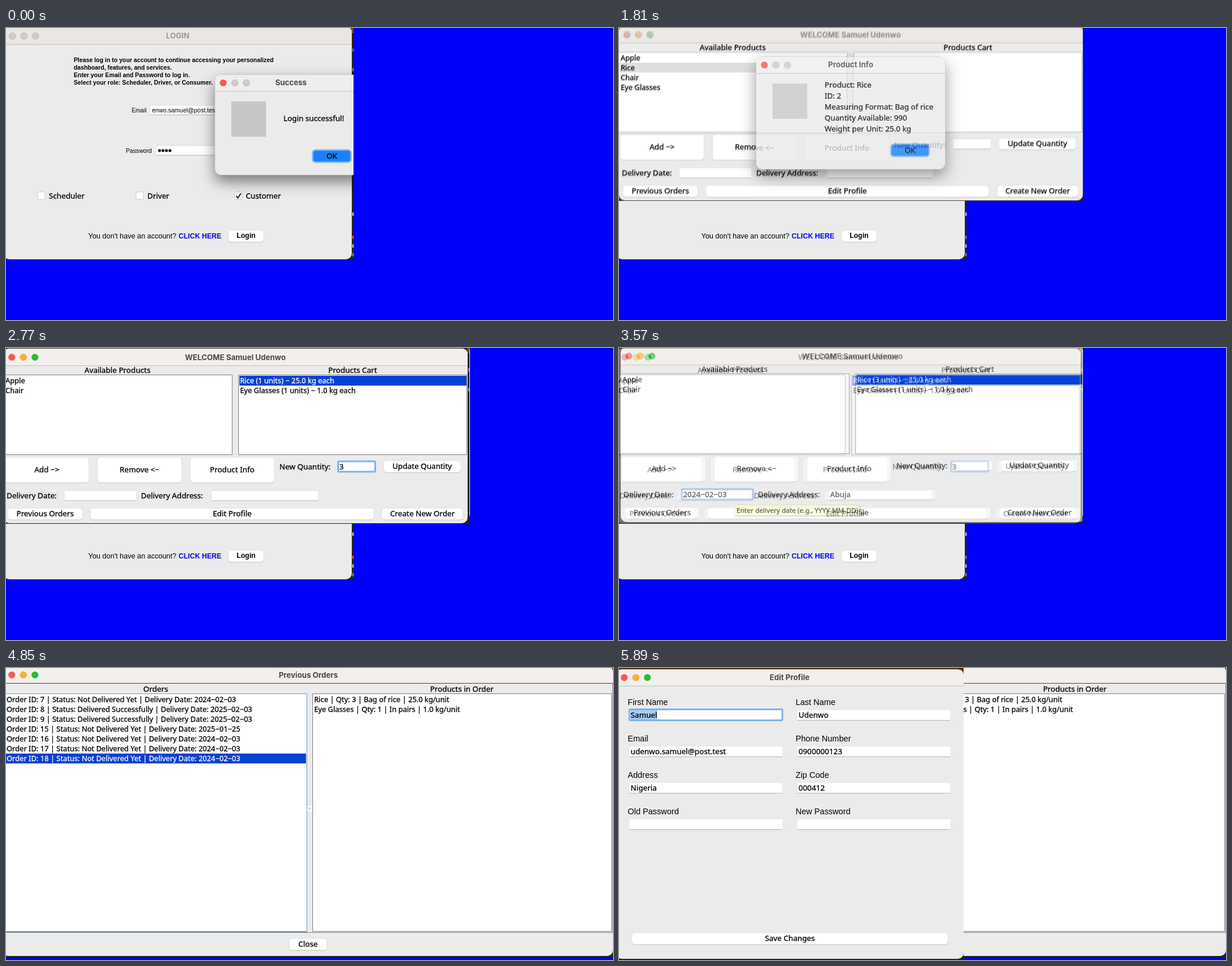
An HTML page for the animation above (6190 ms loop, 1048 by 505 pixels).

```html
<!DOCTYPE html>
<html lang="en">
<head>
<meta charset="utf-8">
<title>Order desk walkthrough</title>
<style>
html, body { margin: 0; width: 100%; height: 100%; overflow: hidden; background: #00f; }
svg { display: block; }
text { white-space: pre; }
</style>
</head>
<body>
<svg id="stage" xmlns="http://www.w3.org/2000/svg" width="1048" height="505" viewBox="0 0 1048 505"></svg>
<script>
const UI = "'Noto Sans', 'Open Sans', sans-serif";
const TITLE = "Inter, Roboto, sans-serif";
const ARIAL = "'Liberation Sans', Arial, sans-serif";
const PANEL = '#ebebeb', BAR = '#f3efec', DARK = '#242322', SELECT = '#0441d4';
const LIGHTS = ['#ff564e', '#fdb225', '#20c032'];
const OFF = ['#cfcbc9', '#cfcbc9', '#cfcbc9'];
const FIRST = 'Samuel', LAST = 'Udenwo';

const rect = (x, y, w, h, fill, more = '') =>
  `<rect x="${x}" y="${y}" width="${w}" height="${h}" fill="${fill}" ${more}/>`;
const line = (x1, y1, x2, y2, stroke, width = 1) =>
  `<path d="M${x1} ${y1}L${x2} ${y2}" stroke="${stroke}" stroke-width="${width}"/>`;

// y is the middle of the capitals; a hairline stroke gives the UI font its darker look
function text(x, y, str, { size = 13.2, font = UI, fill = '#000', weight = 400, anchor = 'start' } = {}) {
  const safe = str.replace(/</g, '&lt;').replace(/>/g, '&gt;');
  const stroke = font === UI ? `stroke="${fill}" stroke-width=".3"` : '';
  return `<text x="${x}" y="${y + size * 0.35}" font-family="${font}" font-size="${size}" ` +
    `font-weight="${weight}" fill="${fill}" text-anchor="${anchor}" ${stroke}>${safe}</text>`;
}
const label = (x, y, str) => text(x, y, str, { anchor: 'middle' });
const item = (x, y, str, fill) => text(x, y, str, { size: 12.6, fill });
const title = (x, y, str, fill = '#4b4745') =>
  text(x, y, str, { size: 13, font: TITLE, weight: 700, anchor: 'middle', fill });

const lights = (x, y, colors) => colors.map((c, i) =>
  `<circle cx="${x + i * 20}" cy="${y}" r="5.8" fill="${c}" stroke="#000" stroke-opacity=".12"/>`).join('');

function button(x, y, w, h, str, style) {
  return rect(x, y + 1, w, h, '#c6c6c6', 'rx="5.5"') +
    rect(x, y, w, h, '#fff', 'rx="5.5" stroke="#d9d9d9" stroke-width=".6"') +
    text(x + w / 2, y + h / 2 - 1, str, { ...style, anchor: 'middle' });
}

function field(x, y, w, h, str = '', focus = false) {
  const box = focus
    ? rect(x, y, w, h, '#fff', 'stroke="#7fb3ec" stroke-width="3" rx="1.5"')
    : rect(x, y, w, h, '#fff') + line(x, y + h, x + w, y + h, '#b4b4b4') +
      line(x, y + 0.5, x + w, y + 0.5, '#dedede');
  return box + text(x + 2, y + h / 2 + 0.5, str);
}

const list = (x, y, w, h, stroke = '#7d7d7d') =>
  rect(x + 0.5, y + 0.5, w, h, '#fff', `stroke="${stroke}"`);

// Dark desktop with a few coloured flecks along the right edge
function desktop(w, h) {
  const flecks = [[38, '#5c86b8'], [72, '#8a8a8a'], [322, '#d8d8c0'], [362, '#d27a2c'], [377, '#e6dc5a'], [392, '#6fae4a']];
  return rect(0, 0, w, h, DARK) + rect(w - 4, 0, 4, 9, '#8a4512') +
    flecks.filter(([y]) => y < h - 4).map(([y, c]) => rect(w - 2, y - 3, 2, 6, c)).join('');
}

function frame(x, y, w, h, barHeight, bar = BAR) {
  return rect(x, y, w, h, PANEL, 'rx="10"') +
    `<path d="M${x} ${y + barHeight}V${y + 10}q0-10 10-10H${x + w - 10}q10 0 10 10V${y + barHeight}z" fill="${bar}"/>` +
    line(x, y + barHeight + 0.5, x + w, y + barHeight + 0.5, '#c3bfbc');
}

function dialog(x, y, w, h, name, lines, textY) {
  const okX = x + w - 94, okY = y + h - 43;
  return rect(x, y, w, h, PANEL, 'rx="10" filter="url(#shadow)" stroke="#a5a5a5" stroke-width=".8"') +
    frame(x, y, w, h, 28, '#f0eeec') +
    lights(x + 14, y + 14, [LIGHTS[0], OFF[0], OFF[0]]) +
    title(x + w / 2, y + 13.5, name) +
    rect(x + 28, y + 46, 60, 61, '#c6c6c6') +
    lines.map((s, i) => text(x + 118, textY + i * 19, s)).join('') +
    rect(okX + 0.5, okY, 66, 21, '#1a80fb', 'rx="5" stroke="#7db4f5" stroke-width="2.5"') +
    label(okX + 33.5, okY + 10.5, 'OK');
}

function checkbox(x, name, checked) {
  return rect(x + 0.5, 283.5, 13, 13, '#fff', 'rx="3" stroke="#c9c9c9"') +
    (checked ? `<path d="M${x + 3.5} 290.5l3 3.5 5-8" fill="none" stroke="#222" stroke-width="2"/>` : '') +
    text(x + 20, 290.5, name);
}

function login() {
  const intro = [
    'Please log in to your account to continue accessing your personalized',
    'dashboard, features, and services.',
    'Enter your Email and Password to log in.',
    'Select your role: Scheduler, Driver, or Consumer.'];
  const small = { size: 10.2, font: ARIAL };
  return desktop(600, 401) + frame(-4, -2, 601, 402, 30, '#e9e6e4') +
    lights(11, 14, OFF) + title(296.5, 13.5, 'LOGIN', '#9d9a98') +
    intro.map((s, i) => text(117, 55 + i * 13, s, { ...small, size: 10.3, weight: 700 })).join('') +
    text(217, 142, 'Email', small) + field(250, 133, 170, 17) +
    text(252, 142, 'enwo.samuel@post.test', { ...small, size: 10.5 }) +
    text(207, 212, 'Password', small) + field(260, 203, 160, 17) +
    [265, 271, 277, 283].map(x => `<circle cx="${x}" cy="212" r="2.5"/>`).join('') +
    checkbox(54, 'Scheduler') + checkbox(224, 'Driver') + checkbox(394, 'Customer', true) +
    text(142, 360, "You don't have an account?", { size: 12.4, font: ARIAL }) +
    text(298, 360, 'CLICK HERE', { size: 12.1, font: ARIAL, weight: 700, fill: '#00f' }) +
    button(384, 350, 61, 20, 'Login', { size: 12, font: ARIAL, weight: 700 }) +
    dialog(361, 81, 262, 173, 'Success', ['Login successful!'], 156.5);
}

function shop(dx, dy, w, h, o) {
  const rows = (x, names, picked, fill) => names.map((s, i) =>
    item(x, 54 + i * 17, s, i === picked ? fill : '#000')).join('');
  const border = o.inactive ? '#c4c4c4' : undefined;
  const body = frame(-1, -2, 801, 302, 29, o.inactive ? '#eae7e5' : BAR) +
    lights(13, 13, o.inactive ? OFF : LIGHTS) +
    title(399, 13, `WELCOME ${FIRST} ${LAST}`, o.inactive ? '#9d9a98' : undefined) +
    label(195.5, 35.5, 'Available Products') + label(601.5, 35.5, 'Products Cart') +
    list(-2, 43, 395, 138, border) + list(404, 43, 394, 138, border) +
    (o.listFocus ? line(-1, 182, 394, 182, '#5a9fdc', 2) : '') +
    (o.grayRow ? rect(0, 62, 393, 17, '#d8d8d8') : '') +
    (o.cart ? rect(406, 45, 392, 17, SELECT) : '') +
    rows(2, o.products) + rows(407, o.cart || [], 0, '#fff') +
    button(1, 186, 145, 44, 'Add −>') + button(161, 186, 145, 44, 'Remove <−') +
    button(321, 186, 145, 44, 'Product Info') +
    text(475, 202.5, 'New Quantity:') + field(576.5, 193, 64, 18, o.quantity, !!o.quantity) +
    button(655, 192, 133, 20, 'Update Quantity') +
    text(4, 252.5, 'Delivery Date:') + field(104.5, 243, 123, 18, o.date, !!o.date) +
    text(236, 252.5, 'Delivery Address:') + field(358.5, 243, 183, 18, o.address) +
    button(6, 274, 129, 20, 'Previous Orders') + button(149, 274, 489, 20, 'Edit Profile') +
    button(652, 274, 140, 20, 'Create New Order');
  return desktop(w, h) + `<g transform="translate(${dx} ${dy})">${body}</g>`;
}

const stock = ['Apple', 'Rice', 'Chair', 'Eye Glasses'];
const cartWith = n => [`Rice (${n} units) − 25.0 kg each`, 'Eye Glasses (1 units) − 1.0 kg each'];

const productInfo = () =>
  shop(1, -2, 801, 299, { products: stock, inactive: true, grayRow: true }) +
  dialog(237, 50, 326, 194, 'Product Info', ['Product: Rice', 'ID: 2', 'Measuring Format: Bag of rice',
    'Quantity Available: 990', 'Weight per Unit: 25.0 kg'], 98.5);

const checkout = () =>
  shop(4, 1, 805, 304, { products: ['Apple', 'Chair'], cart: cartWith(3), date: '2024−02−03', address: 'Abuja' }) +
  rect(200, 273, 217, 19, '#000', 'opacity=".18"') +
  rect(199.5, 271.5, 215, 18, '#ffffc9', 'stroke="#cfcfae" stroke-width=".8"') +
  text(203, 281, 'Enter delivery date (e.g., YYYY-MM-DD)', { size: 11.6 });

function orders() {
  const sent = 'Delivered Successfully', open = 'Not Delivered Yet';
  const rows = [[7, open, '2024−02−03'], [8, sent, '2025−02−03'], [9, sent, '2025−02−03'], [15, open, '2025−01−25'],
    [16, open, '2024−02−03'], [17, open, '2024−02−03'], [18, open, '2024−02−03']];
  return rect(0, 0, 1048, 500, DARK) + frame(-6, -3, 1054, 501, 29) +
    lights(10, 12, LIGHTS) + title(522, 12, 'Previous Orders') +
    line(0, 26.5, 1048, 26.5, '#444') +
    label(258.5, 36.5, 'Orders') + label(787, 36.5, 'Products in Order') +
    list(-2, 44, 521, 412, '#6a9fcd') + line(0, 456, 519, 456, '#5a9fdc', 2) +
    list(529, 44, 516, 411) + line(0, 457.5, 1048, 457.5, '#858585') + line(1047.5, 27, 1047.5, 457, '#8a8a8a') +
    rect(520, 238, 9, 10, '#fff') + '<circle cx="524" cy="243" r="2.5" fill="#ddd"/>' +
    rect(0, 148, 518, 17, SELECT) +
    rows.map(([id, status, date], i) => item(1, 55 + i * 17,
      `Order ID: ${id} | Status: ${status} | Delivery Date: ${date}`, i === 6 ? '#fff' : '#000')).join('') +
    item(532, 55, 'Rice | Qty: 3 | Bag of rice | 25.0 kg/unit') +
    item(532, 72, 'Eye Glasses | Qty: 1 | In pairs | 1.0 kg/unit') +
    button(489, 468, 65, 20, 'Close');
}

function profile() {
  const entries = [['First Name', FIRST], ['Last Name', LAST],
    ['Email', 'udenwo.samuel@post.test'], ['Phone Number', '0900000123'],
    ['Address', 'Nigeria'], ['Zip Code', '000412'], ['Old Password', ''], ['New Password', '']];
  return rect(0, 0, 595, 505, DARK) + rect(0, 0, 595, 8, '#5a2a10') + frame(-5, 2.5, 600, 500.5, 28) +
    lights(9, 16.5, LIGHTS) + title(294.5, 16.5, 'Edit Profile') +
    entries.map(([name, value], i) => {
      const x = i % 2 * 290, y = (i >> 1) * 63;
      return text(x + 15, y + 59.5, name, { size: 14.2, font: ARIAL }) +
        field(x + 18, y + 71.5, 264, 19, i ? value : '', !i) +
        (i ? '' : rect(20, 73, 46, 16, '#a5cdff') + text(20, 81.5, value));
    }).join('') +
    button(22, 458, 546, 20, 'Save Changes');
}

const scenes = [
  { start: 0, w: 600, h: 401, art: login() },
  { start: 350, w: 801, h: 299, art: shop(0, 0, 801, 299, { products: stock, listFocus: true }) },
  { start: 1390, w: 801, h: 299, art: productInfo() },
  { start: 2230, w: 800, h: 304, art: shop(-3, 3, 800, 304, { products: ['Apple', 'Chair'], cart: cartWith(1), quantity: '3' }) },
  { start: 3270, w: 805, h: 304, art: checkout() },
  { start: 4310, w: 1048, h: 500, art: orders() },
  { start: 5350, w: 595, h: 505, art: profile() }
];
const LOOP = 6190, STEP = 60, STEPS = 10;

const stage = document.getElementById('stage');
stage.innerHTML = `<defs><filter id="shadow" x="-30%" y="-30%" width="160%" height="170%">
  <feDropShadow dx="0" dy="11" stdDeviation="13" flood-color="#000" flood-opacity=".5"/></filter>
  ${scenes.map((s, i) => `<clipPath id="clip${i}"><rect width="${s.w}" height="${s.h}"/></clipPath>`).join('')}</defs>
  ${rect(0, 0, 1048, 505, '#00f')}
  ${scenes.map((s, i) => `<g id="scene${i}" clip-path="url(#clip${i})">${s.art}</g>`).join('')}`;
const groups = scenes.map((s, i) => document.getElementById('scene' + i));
const clips = scenes.map((s, i) => document.querySelector(`#clip${i} rect`));

// Each scene fades in over the area shared with the one before, then appears whole.
function draw(t) {
  scenes.forEach((s, i) => {
    const step = i ? Math.max(0, Math.min(STEPS, Math.floor((t - s.start) / STEP) + 1)) : STEPS;
    const limit = step < STEPS ? scenes[i - 1] : s;
    groups[i].setAttribute('display', step ? 'inline' : 'none');
    groups[i].setAttribute('opacity', step / STEPS);
    clips[i].setAttribute('width', Math.min(s.w, limit.w));
    clips[i].setAttribute('height', Math.min(s.h, limit.h));
  });
}

const began = performance.now();
function tick() {
  draw((performance.now() - began) % LOOP);
  requestAnimationFrame(tick);
}
tick();
</script>
</body>
</html>
```
